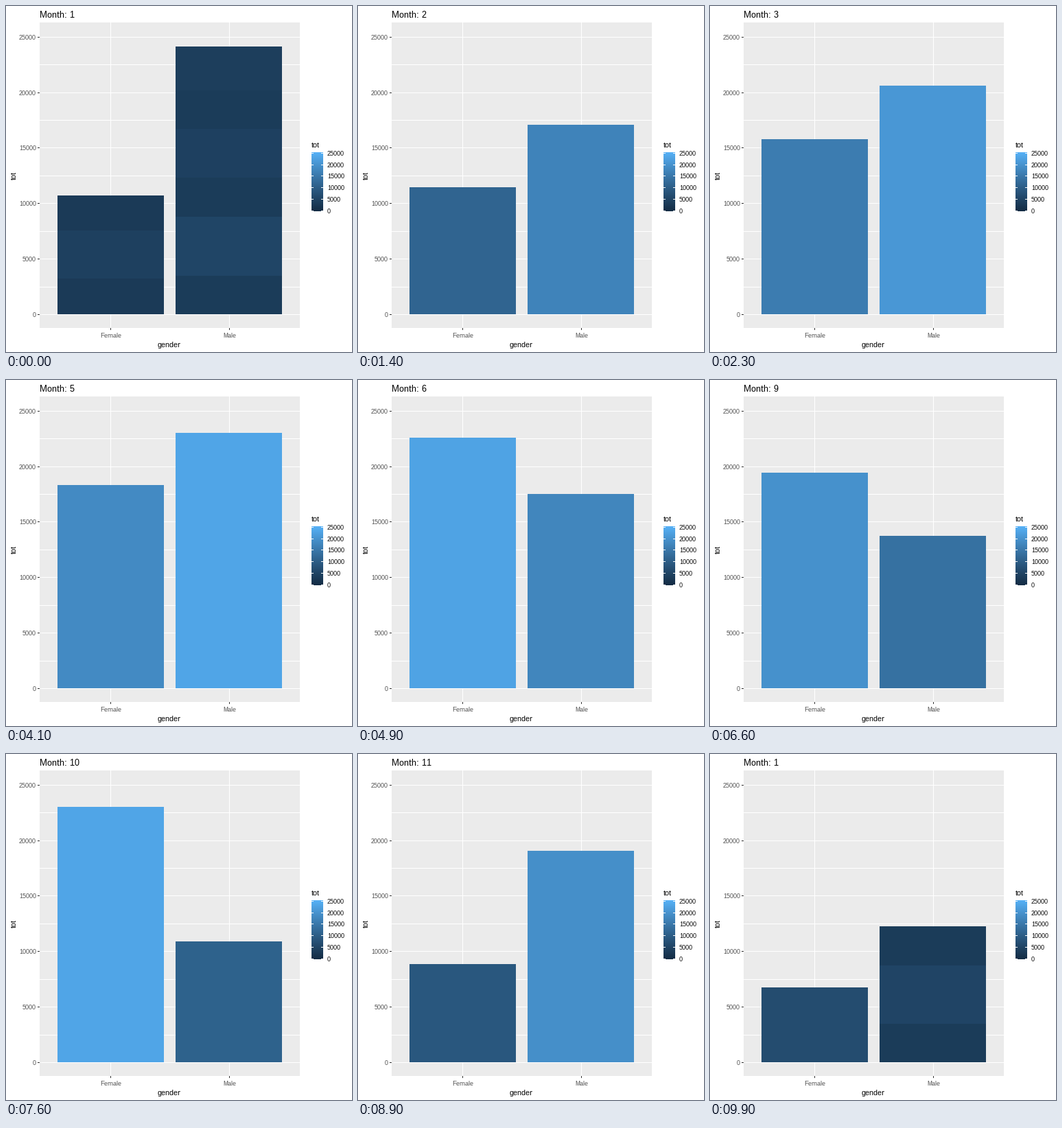
These frames come from a looping animation (504 px wide and 504 px high, 10 s). A matplotlib script:

```python
import numpy as np
import matplotlib.pyplot as plt
from matplotlib.animation import FuncAnimation
from matplotlib.patches import Rectangle

SIZE, DPI = 504, 72
FRAMES, STEP_MS = 100, 100
TWEEN = 4
BASE, SCALE = 448.95, 16.167  # y of zero, pixels per thousand
BAR_X, BAR_W = (75, 247), 155
GREY, TICK = "#4D4D4D", "#333333"

plt.rcParams.update({"font.family": "Liberation Sans",
                     "text.hinting": "native", "text.hinting_factor": 1})


def stack(n, size, bump):
    """Upper edges of n pieces; every second one is larger by a halving bump."""
    parts = [size + (k % 2) * bump / 2 ** (k // 2) for k in range(n)]
    return list(np.cumsum(parts))


# Monthly totals in thousands
FEMALE = [stack(3, 3.19, 1.14)] + [[v] for v in (
    9.5, 17.27, 11.32, 16.16, 24.8, 16, 18.34, 20.5, 23.02, 6, 17.41)]
MALE = [stack(6, 3.49, 1.825)] + [[v] for v in (
    16, 20.2, 21.82, 24.3, 19.18, 12.5, 19.18, 8.23, 10.89, 24.25)]
MALE.append(stack(3, 3.49, 1.6))


def arrival(k):
    """Frame at which month k (from 0) is reached; months 2 to 5 rest longer."""
    return 8 * k + min(max(k - 1, 0), 4)


# --- colour scale, blended in CIE Lab ---
RGB_XYZ = np.array([[0.4125, 0.3576, 0.1804],
                    [0.2127, 0.7152, 0.0722],
                    [0.0193, 0.1192, 0.9503]])
WHITE = RGB_XYZ.sum(axis=1)


def to_lab(rgb):
    c = np.array(rgb) / 255
    lin = np.where(c > 0.04045, ((c + 0.055) / 1.055) ** 2.4, c / 12.92)
    x, y, z = np.cbrt(RGB_XYZ @ lin / WHITE)
    return np.array([116 * y - 16, 500 * (x - y), 200 * (y - z)])


def to_rgb(lab):
    y = (lab[0] + 16) / 116
    xyz = np.array([y + lab[1] / 500, y, y - lab[2] / 200]) ** 3 * WHITE
    lin = np.clip(np.linalg.solve(RGB_XYZ, xyz), 0, 1)
    c = np.where(lin > 0.0031308, 1.055 * lin ** (1 / 2.4) - 0.055, 12.92 * lin)
    return np.clip(c, 0, 1)


LOW, HIGH = to_lab((19, 43, 67)), to_lab((86, 177, 247))


def fill(value):
    t = min(max(value / 25, 0), 1)
    return to_rgb(LOW + (HIGH - LOW) * t)


# --- stage ---
fig = plt.figure(figsize=(SIZE / DPI, SIZE / DPI), dpi=DPI, facecolor="white")
ax = fig.add_axes([0, 0, 1, 1])
ax.set_xlim(0, SIZE)
ax.set_ylim(SIZE, 0)
ax.axis("off")


def box(x, y, w, h, color, z=1):
    patch = Rectangle((x, y), w, h, facecolor=color, edgecolor="none",
                      linewidth=0, antialiased=False, zorder=z)
    return ax.add_patch(patch)


def label(x, y, text, size, color="black", ha="left", va="baseline", **kw):
    return ax.text(x, y, text, fontsize=size, color=color, ha=ha, va=va, **kw)


def y_pos(value):
    return int(round(BASE - value * SCALE))


box(49, 24, 379, 445, "#EBEBEB")
for k in range(11):
    box(49, y_pos(2.5 * k), 379, 1, "white", 2)
for v in range(0, 26, 5):
    box(46, y_pos(v), 3, 1, TICK)
    label(44, y_pos(v) + 4, str(v * 1000), 9, GREY, "right")
for x, name in ((152, "Female"), (325, "Male")):
    box(x, 24, 1, 445, "white", 2)
    box(x, 469, 1, 3, TICK)
    label(x + 0.5, 483, name, 9, GREY, "center")
label(238, 497, "gender", 11, ha="center")
label(17, 247, "tot", 11, ha="right", va="center", rotation=90)
title = label(49, 17, "", 13)

# --- legend ---
label(445, 206, "tot", 11)
for row in range(86):
    box(445, 213 + row, 17, 1, fill(25 * (1 - (row + 0.5) / 86)))
for k in range(6):
    y = int(round(297.8 - 16.8 * k))
    for x in (445, 459):
        box(x, y, 3, 1, "white", 2)
    label(468, y + 4, str(5000 * k), 9)

# --- bars ---
bars = [[box(x, y_pos(0), BAR_W, 0, "black", 5) for _ in range(6)] for x in BAR_X]


def blend(old, new, t):
    if t == 0:
        return old
    # only pieces present in both months take part in the move
    return [a + (b - a) * t for a, b in zip(old, new)]


def draw(i):
    m = max(k for k in range(12) if arrival(k) <= i)
    nxt = (m + 1) % 12
    t = max(0, i - arrival(m + 1) + TWEEN) / TWEEN
    title.set_text(f"Month: {(nxt if t >= 0.5 else m) + 1}")
    for data, group in zip((FEMALE, MALE), bars):
        tops = blend(data[m], data[nxt], t)
        for bar in group:
            bar.set_visible(False)
        low = 0
        for bar, top in zip(group, tops):
            bar.set_visible(True)
            bar.set_y(y_pos(top))
            bar.set_height(y_pos(low) - y_pos(top))
            bar.set_facecolor(fill(top - low))
            low = top
    return [title] + bars[0] + bars[1]


anim = FuncAnimation(fig, draw, frames=FRAMES, interval=STEP_MS,
                     repeat=True, repeat_delay=0, blit=False)
plt.show()
```
